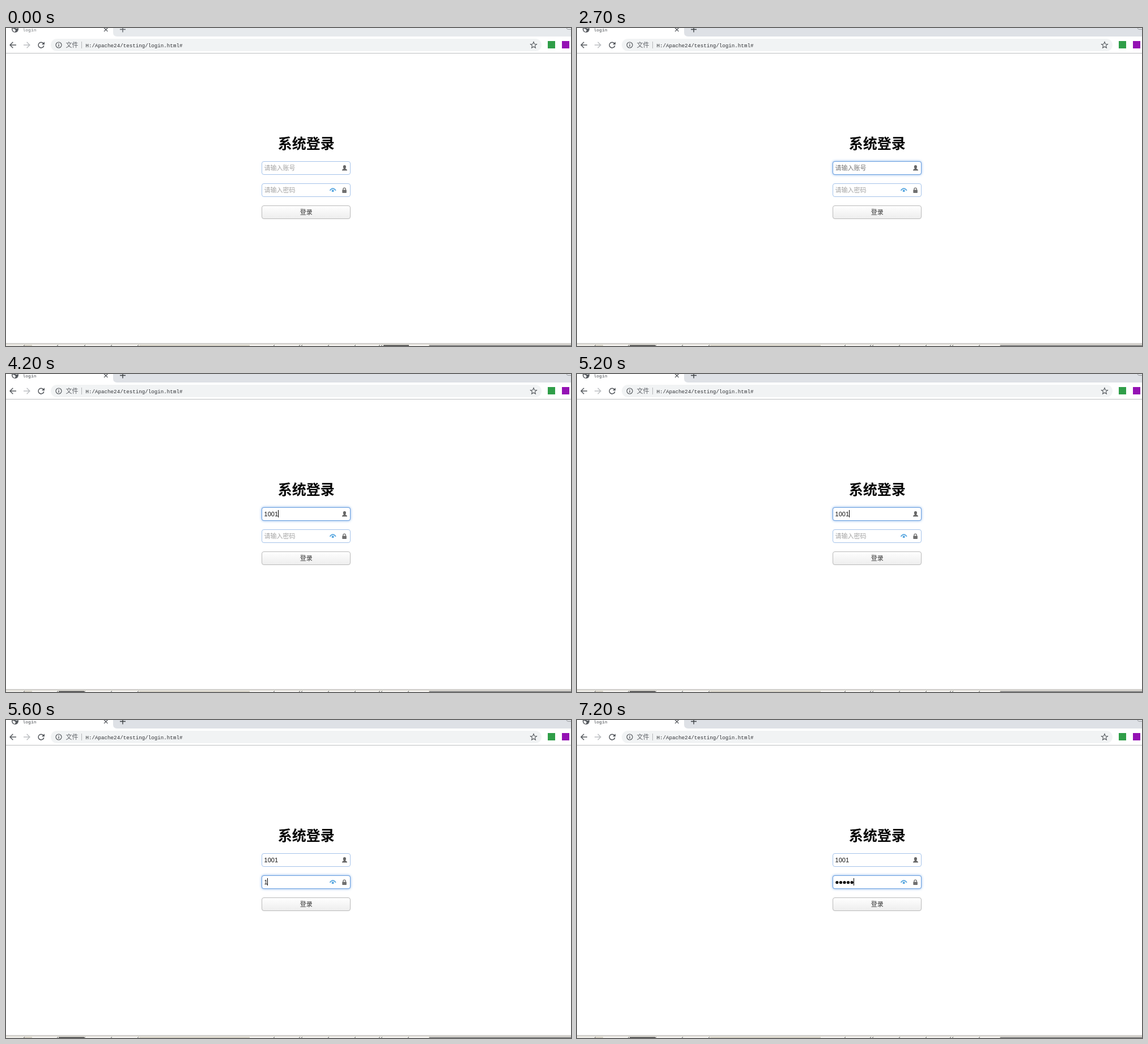
These frames come from a looping animation (997x561 px, 8000 ms). An HTML page with a canvas:

```html
<!DOCTYPE html>
<html lang="zh-CN">
<head>
<meta charset="utf-8">
<title>login</title>
<style>
html, body { margin: 0; width: 100%; height: 100%; overflow: hidden; background: #fff; }
canvas { display: block; }
</style>
</head>
<body>
<canvas id="stage" width="997" height="561"></canvas>
<script>
const ctx = document.getElementById('stage').getContext('2d');
const LOOP = 8000;
const CJK = '"Noto Sans CJK SC", "Noto Sans CJK", sans-serif';
const ARIAL = '"Liberation Sans", sans-serif';
const MONO = '"Liberation Mono", monospace';
const DARK = '#55595e';
const DIGIT = 6.1, DOT = 6.55, TEXT_X = 455.6;

// Each entry: start time, focused field, account, password, caret shown
const steps = [
  [0, '', '', '', false],
  [1200, 'account', '', '', true],
  [1700, 'account', '', '', false],
  [2200, 'account', '', '', true],
  [2700, 'account', '', '', false],
  [3000, 'account', '1', '', true],
  [3300, 'account', '10', '', true],
  [3400, 'account', '100', '', true],
  [3900, 'account', '100', '', false],
  [4200, 'account', '1001', '', true],
  [4700, 'account', '1001', '', false],
  [5200, 'account', '1001', '', true],
  [5300, 'password', '1001', '', true],
  [5600, 'password', '1001', '1', true],
  [5700, 'password', '1001', '●', true],
  [5800, 'password', '1001', '●0', true],
  [5900, 'password', '1001', '●●', true],
  [6000, 'password', '1001', '●●0', true],
  [6700, 'password', '1001', '●●●●', true],
  [7200, 'password', '1001', '●●●●●', true]
];

function rect(x, y, w, h, color) {
  ctx.fillStyle = color;
  ctx.fillRect(x, y, w, h);
}

function text(str, x, y, font, color, align = 'left') {
  ctx.font = font;
  ctx.fillStyle = color;
  ctx.textAlign = align;
  ctx.fillText(str, x, y);
}

function stroke(path, color, width = 1.5) {
  ctx.strokeStyle = color;
  ctx.lineWidth = width;
  ctx.stroke(new Path2D(path));
}

function fill(path, color) {
  ctx.fillStyle = color;
  ctx.fill(new Path2D(path));
}

function disc(x, y, r, color) {
  ctx.beginPath();
  ctx.arc(x, y, r, 0, Math.PI * 2);
  ctx.fillStyle = color;
  ctx.fill();
}

function box(x, y, w, h, r, color, border) {
  ctx.beginPath();
  ctx.roundRect(x, y, w, h, r);
  ctx.fillStyle = color;
  ctx.fill();
  if (!border) return;
  ctx.strokeStyle = border;
  ctx.lineWidth = 1;
  ctx.stroke();
}

function drawStar(x, y, r) {
  ctx.beginPath();
  for (let i = 0; i < 10; i++) {
    const a = -Math.PI / 2 + i * Math.PI / 5;
    const d = i % 2 ? r * 0.45 : r;
    ctx.lineTo(x + d * Math.cos(a), y + d * Math.sin(a));
  }
  ctx.closePath();
  ctx.strokeStyle = DARK;
  ctx.lineWidth = 1.1;
  ctx.stroke();
}

function drawTabs(active) {
  rect(0, 0, 997, 15, active ? '#dee1e6' : '#e7eaed');
  fill('M0 0H189V8Q189 15 196 15H0Z', '#fff');
  disc(16, 2, 6, DARK);
  fill('M11.5 1L15 1.8L17 4L15.5 7Q11.5 6 11.5 1Z', '#fff');
  fill('M15 -3H20L20.5 1L17 .8Z', '#fff');
  text('login', 29.5, 6, '8px ' + MONO, active ? '#45494d' : '#72767a');
  stroke('M173 -.3L179.4 6.1M179.4 -.3L173 6.1', DARK, 1.3);
  stroke('M201 2.5H211M206 -2V7.5', active ? '#3c4043' : '#60646a', 1.4);
  stroke('M989 0Q990 2.5 992 2.5H997', '#9a9da1', 1);
}

function drawToolbar() {
  stroke('M18 30H7.5M12.3 24.8L7.1 30L12.3 35.2', DARK);
  stroke('M31 30H41.5M36.7 24.8L41.9 30L36.7 35.2', '#bcbfc2');
  stroke('M65.8 27A4.9 4.9 0 1 0 66.8 31', DARK);
  fill('M68 24.3V29.3H63Z', DARK);

  box(79, 19, 866, 22, 11, '#f1f3f4');
  stroke('M88 30A5 5 0 1 0 98 30A5 5 0 1 0 88 30', DARK, 1.2);
  rect(92.4, 29, 1.3, 4, DARK);
  rect(92.4, 26.8, 1.3, 1.3, DARK);
  text('文件', 105.5, 34, '11px ' + CJK, '#5f6368');
  rect(133, 24, 1, 12, '#b4b7ba');
  text('H:/Apache24/testing/login.html#', 140.5, 33.5, '9.2px ' + MONO, '#303236');
  drawStar(931, 30.3, 5.8);
  rect(956, 23, 13, 13, '#2f9e48');
  rect(981, 23, 13, 13, '#9412b4');
  rect(0, 44, 997, 1, '#bdbfc1');
}

function drawBottom(active) {
  rect(0, 556, 997, 1, '#b3b1ad');
  rect(0, 557, 997, 1, '#f4f3f0');
  rect(0, 558, 997, 3, '#d8d4ca');
  rect(0, 559, 33, 2, '#efeeea');
  rect(46, 559, 189, 2, '#f8f7f5');
  rect(430, 559, 316, 2, '#f8f7f5');
  rect(747, 559, 250, 2, '#979797');
  for (const x of [32, 91, 139, 186, 233, 473, 518, 522, 569, 616, 659, 663, 710])
    stroke(`M${x - 1} 561L${x + 1} 559`, '#555', 1);
  rect(active ? 93 : 666, 559, 45, 2, '#666');
}

function drawField(y, focused, hint, value, caret) {
  if (focused) {
    ctx.save();
    ctx.shadowColor = 'rgba(80, 145, 225, .6)';
    ctx.shadowBlur = 4;
    box(451.5, y + .5, 156, 23, 3.5, '#fff', '#6a9fe0');
    ctx.restore();
  }
  box(451.5, y + .5, 156, 23, 3.5, '#fff', focused ? '#6a9fe0' : '#a5c3ea');
  if (!value) text(hint, 455.5, y + 16, '11px ' + CJK, focused ? '#757575' : '#a3a3a3');

  let x = TEXT_X;
  for (const ch of value) {
    if (ch === '●') {
      disc(x + DOT / 2, y + 12.5, 2.6, '#000');
      x += DOT;
    } else {
      text(ch, x, y + 16, '11px ' + ARIAL, '#111');
      x += DIGIT;
    }
  }
  if (caret) rect(Math.floor(x), y + 5, 1, 13, '#000');
}

function drawIcons() {
  ctx.beginPath();
  ctx.ellipse(597.4, 245, 2.6, 3.1, 0, 0, Math.PI * 2);
  ctx.fillStyle = '#666';
  ctx.fill();
  fill('M596 246H599V248.3Q602 249 602 251.5H593Q593 249 596 248.3Z', '#666');

  stroke('M571.5 286.8Q576.7 279.5 582 286.8', '#55a5df', 1.7);
  disc(576.7, 287.3, 2, '#55a5df');

  box(593.3, 285.5, 7.6, 5.5, .7, '#707070');
  stroke('M594.9 286V284.3A2.2 2.2 0 0 1 599.3 284.3V286', '#707070', 1.3);
}

function drawButton() {
  const shade = ctx.createLinearGradient(0, 313, 0, 337);
  shade.addColorStop(0, '#fff');
  shade.addColorStop(1, '#ededed');
  box(451.5, 313.5, 156, 23, 3.5, shade, '#bababa');
  text('登录', 529.7, 329, '11px ' + CJK, '#333', 'center');
}

function draw(time) {
  const [, focus, account, password, caret] = steps.findLast(s => s[0] <= time);
  rect(0, 0, 997, 561, '#fff');
  drawTabs(focus !== '');
  drawToolbar();
  text('系统登录', 529.7, 213, 'bold 25px ' + CJK, '#000', 'center');
  drawField(235, focus === 'account', '请输入账号', account, caret && focus === 'account');
  drawField(274, focus === 'password', '请输入密码', password, caret && focus === 'password');
  drawIcons();
  drawButton();
  drawBottom(focus !== '');
}

const start = performance.now();
function tick() {
  draw((performance.now() - start) % LOOP);
  requestAnimationFrame(tick);
}
tick();
</script>
</body>
</html>
```
